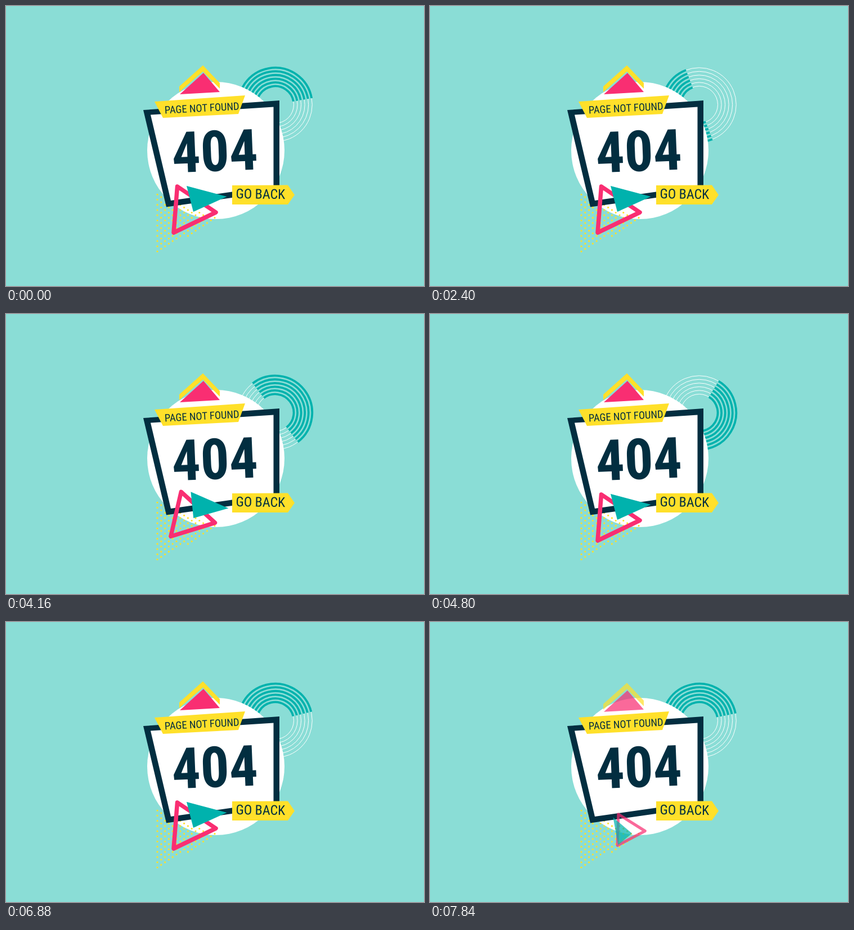
An HTML page that plays this animation: 743 px wide and 498 px high, repeating every 8000 ms.

```html
<!DOCTYPE html>
<html lang="en">
<head>
<meta charset="utf-8">
<title>Page not found</title>
<style>
  html, body { margin: 0; width: 100%; height: 100%; overflow: hidden; background: #fefefe; }
  svg { display: block; width: 743px; height: 498px; }
  text { font-family: "Roboto Condensed", Roboto, sans-serif; font-stretch: 75%; fill: #022e40; }
  .yellow { fill: #ffe02a; }
  .pink { fill: #f92e72; }
  .teal { fill: #00b2ad; }
</style>
</head>
<body>
<svg viewBox="0 0 743 498">
  <g id="page">
    <rect width="743" height="498" fill="#8addd6"/>
    <g id="rings" fill="none"></g>
    <circle cx="373" cy="257" r="122" fill="#fff"/>
    <g id="dots" class="yellow"></g>
    <g id="peak">
      <path class="yellow" d="M308 143 350 105.5 380 137V147L350 116.5 308 153Z"/>
      <path class="pink" d="M309 157 351 119 380 153Z"/>
    </g>
    <path d="M244 185 486 168V329L285 357.5Z" fill="#022e40"/>
    <path d="M257 193.5 475.5 179.5V320L293 346Z" fill="#fff"/>
    <text transform="translate(372.5 293.5) rotate(-2.3)" font-size="101" font-weight="700" text-anchor="middle">404</text>
    <path class="yellow" d="M264 170 425 159 413 192 279 199Z"/>
    <text transform="translate(348.5 188) rotate(-3)" font-size="18.6" text-anchor="middle">PAGE NOT FOUND</text>
    <path id="outline" d="M304.5 321 373 367 298 403Z" fill="none" stroke="#f92e72" stroke-width="7.5" stroke-linejoin="round"/>
    <path id="shard" class="teal" d="M321 320 392.5 339 333 366Z"/>
    <path class="yellow" d="M402 319 501 318.5 513 336 501 353H402Z"/>
    <text transform="translate(452.3 342.6) rotate(.7)" font-size="24" text-anchor="middle">GO BACK</text>
  </g>
</svg>
<script>
const $ = id => document.getElementById(id);
const LOOP = 8000, STEP = 160;
const CX = 478.5, CY = 175.5;

function add(parent, tag, attrs) {
  const el = document.createElementNS('http://www.w3.org/2000/svg', tag);
  for (const k in attrs) el.setAttribute(k, attrs[k]);
  parent.appendChild(el);
  return el;
}

// Concentric rings: thin white circles with a turning teal half on top
const radii = Array.from({ length: 6 }, (_, i) => 33 + i * 6.55);
for (const r of radii) add($('rings'), 'circle', { cx: CX, cy: CY, r, stroke: '#fff', 'stroke-width': 1 });
const halves = add($('rings'), 'path', {
  d: radii.map(r => `M${CX - r} ${CY}A${r} ${r} 0 0 1 ${CX + r} ${CY}`).join(''),
  stroke: '#00b2ad', 'stroke-width': 3.8
});

// Staggered dots inside a triangle
for (let i = 0; i < 17; i++) {
  const x = 269 + i * 6.8;
  for (let y = 436.5 - (i % 2) * 4.6; y > 333 + 0.42 * (x - 268); y -= 9.2)
    if (y < 438 - 0.52 * (x - 268)) add($('dots'), 'circle', { cx: x, cy: y, r: 1.6 });
}

// CSS "ease" curve
function ease(x) {
  if (x <= 0) return 0;
  if (x >= 1) return 1;
  let lo = 0, hi = 1;
  const bez = (a, b, u) => 3 * a * u * (1 - u) ** 2 + 3 * b * u * u * (1 - u) + u ** 3;
  for (let i = 0; i < 30; i++) {
    const mid = (lo + hi) / 2;
    if (bez(0.25, 0.25, mid) < x) lo = mid; else hi = mid;
  }
  return bez(0.1, 1, lo);
}

// Time since the page last loaded, or -1 while it is blank
function age(t) {
  if (t < 3440) return t + 3555;
  if (t < 7040) return t - 3360;
  return t < 7680 ? -1 : t - 7629;
}

function spin(el, ox, oy, angle, scale, opacity) {
  el.setAttribute('transform',
    `translate(${ox} ${oy}) rotate(${angle}) scale(${scale}) translate(${-ox} ${-oy})`);
  el.setAttribute('opacity', opacity);
}

function draw(t) {
  const e = age(t);
  $('page').style.display = e < 0 ? 'none' : '';
  if (e < 0) return;

  halves.setAttribute('transform', `rotate(${(326 + 0.108 * e) % 360} ${CX} ${CY})`);

  const fade = ease(e / 500), turn = ease(e / 1000);
  $('peak').setAttribute('transform', `translate(0 ${10 * (1 - fade)})`);
  $('peak').setAttribute('opacity', fade);

  const scale = 0.52 + 0.48 * turn;
  spin($('outline'), 342.5, 361.3, 350 * (1 - turn), scale, fade);
  spin($('shard'), 352.5, 364.5, 360 * (1 - turn), scale, fade);
}

const start = performance.now();
function tick() {
  const t = (performance.now() - start) % LOOP;
  draw(Math.floor(t / STEP) * STEP);
  requestAnimationFrame(tick);
}
tick();
</script>
</body>
</html>
```
